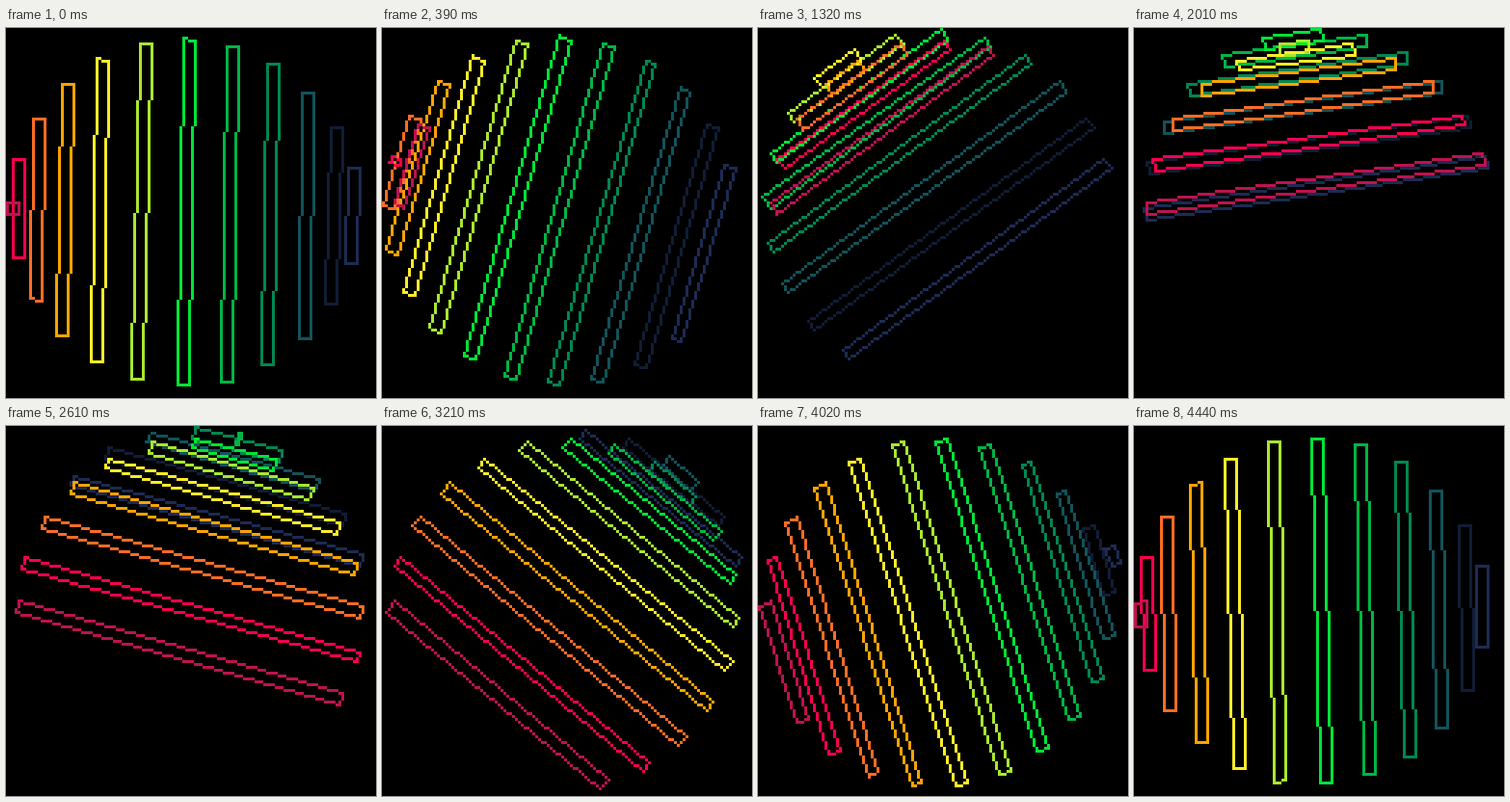
Write an HTML page with a canvas that moves like this. It is 384 px wide and 384 px high and loops after 4470 ms.

```html
<!DOCTYPE html>
<html lang="en">
<head>
<meta charset="utf-8">
<title>Turning chords</title>
<style>
  html, body { margin: 0; width: 100%; height: 100%; overflow: hidden; background: #000; }
  canvas { display: block; width: 100vw; height: 100vh; image-rendering: pixelated; }
</style>
</head>
<body>
<canvas id="stage" width="384" height="384"></canvas>
<script>
const ctx = document.getElementById('stage').getContext('2d');
const CELL = 3, MID = 64, RADIUS = 60, WIDTH = 4;
const STEP_MS = 30, STEPS = 149;
const TURN = 2 * Math.PI;
const SPACING = TURN * 2686 / 65536;
const COLORS = [
  '#1d2b53', '#111d35', '#125359', '#008751', '#00b543', '#00e436',
  '#a8e72e', '#ffec27', '#ffa300', '#ff6c24', '#ff004d', '#be1250'
];

const onCircle = a => [MID + RADIUS * Math.cos(a), MID - RADIUS * Math.sin(a)];
const plot = (x, y) => ctx.fillRect(x * CELL, y * CELL, CELL, CELL);

// Hard-edged line on the coarse grid, with a 16-bit fixed-point slope.
function line(p, q) {
  let a = p.map(Math.floor), b = q.map(Math.floor);
  const major = Math.abs(b[0] - a[0]) >= Math.abs(b[1] - a[1]) ? 0 : 1;
  const minor = 1 - major;
  if (a[major] > b[major]) [a, b] = [b, a];
  const length = b[major] - a[major];
  const slope = length ? Math.trunc((b[minor] - a[minor]) / length * 65536) / 65536 : 0;
  for (let k = 0; k <= length; k++) {
    const u = a[major] + k;
    const v = Math.floor(a[minor] + 0.5 + slope * k);
    if (major === 0) plot(u, v); else plot(v, u);
  }
}

// Outlined bar from a to b, widened to one side only.
function bar(a, b) {
  const dir = Math.atan2(b[1] - a[1], b[0] - a[0]);
  const shift = ([x, y]) => [x - WIDTH * Math.sin(dir), y + WIDTH * Math.cos(dir)];
  const corners = [a, b, shift(b), shift(a)];
  corners.forEach((c, i) => line(c, corners[(i + 1) % 4]));
}

function draw(step) {
  const swing = TURN * (step + 1) / 150;
  ctx.fillStyle = '#000';
  ctx.fillRect(0, 0, 384, 384);
  COLORS.forEach((color, i) => {
    const angle = (i + 1) * SPACING;
    ctx.fillStyle = color;
    bar(onCircle(angle), onCircle(-angle - swing));
  });
}

function tick() {
  draw(Math.floor(performance.now() / STEP_MS) % STEPS);
  requestAnimationFrame(tick);
}
tick();
</script>
</body>
</html>
```
